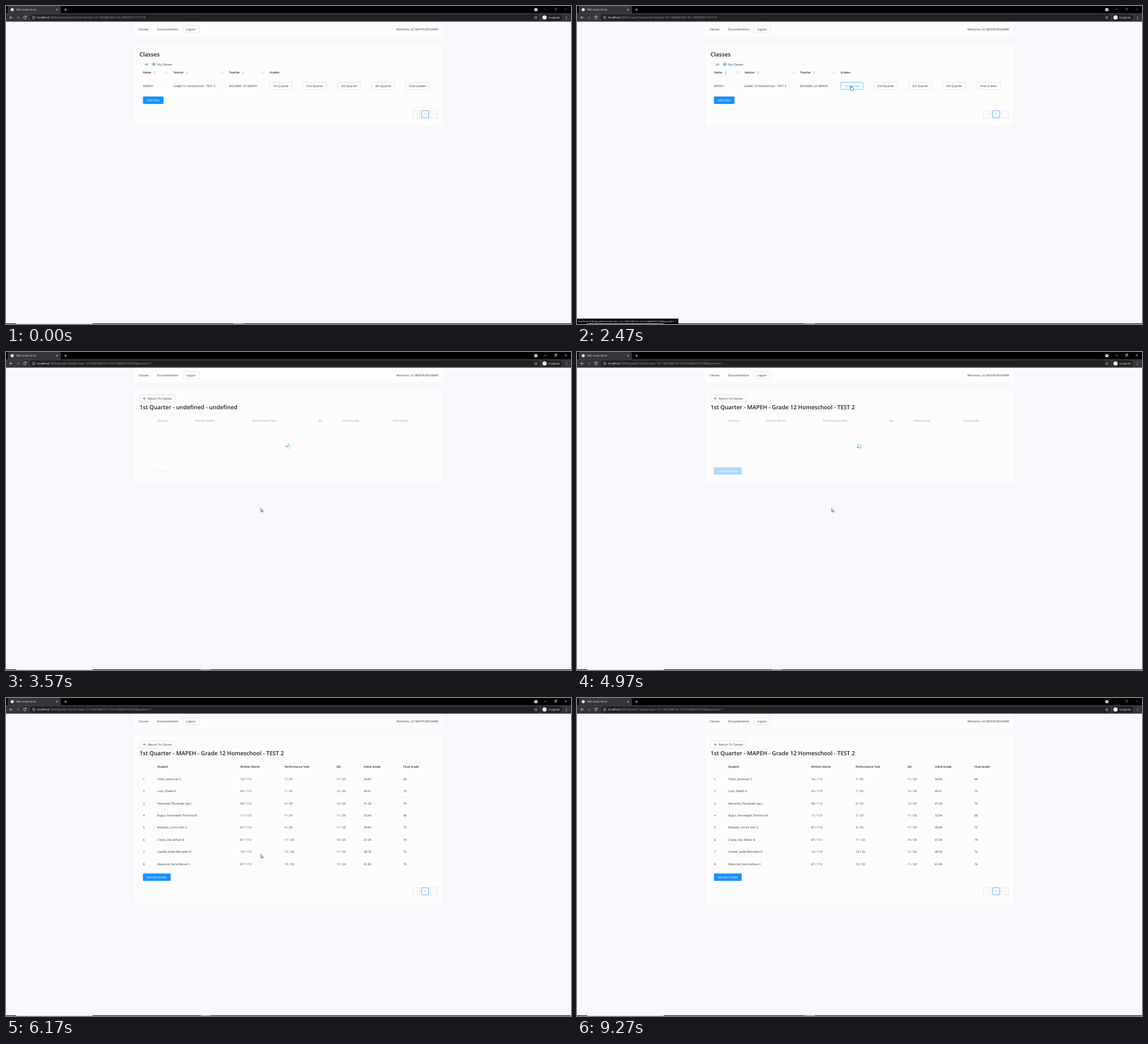
Recreate the animation shown at these times as an HTML page. Size 998 px wide and 561 px high, loop 9.47 s.

```html
<!DOCTYPE html>
<html lang="en">
<head>
<meta charset="utf-8">
<title>Grade portal</title>
<style>
  html, body { margin: 0; width: 100%; height: 100%; overflow: hidden; background: #f8f8fc; }
  svg { display: block; width: 100%; height: 100%; }
  text { font-family: "Open Sans", "Noto Sans", sans-serif; text-rendering: geometricPrecision; white-space: pre; }
</style>
</head>
<body>
<svg id="stage" viewBox="0 0 998 561"></svg>
<script>
const LOOP = 9470;
const OPENED = 2670, TITLED = 3900, LOADED = 5400, FADE = 300;
const HOVERED = 2070, FOCUSED = 2560, BLURRED = 9250;
const BLUE = '#1890ff', HOVER = '#40a9ff', INK = '#343434', DARK = '#202020';

const HOST = 'localhost';
const CLASSES_PATH = ':3000/classes?sectionId=section-1617464881803-50.149939751107176';
const GRADE_PATH = ':3000/grade?classId=class-1617482288154-75.61636894703783&quarter=1';

const STUDENTS = [
  ['Tolim, Jeremuel T.', '16 / 113', '7 / 20', '11 / 20', '34.83', '68'],
  ['Lum, Obeth K.', '43 / 113', '7 / 20', '12 / 20', '40.61', '70'],
  ['Maronita, Pluvander Jay L.', '58 / 113', '6 / 20', '13 / 20', '41.26', '70'],
  ['Bug-o, Fernwalph Thorlina M.', '11 / 113', '7 / 20', '11 / 20', '33.94', '68'],
  ['Botiwan, Lorick Ulm S.', '67 / 113', '9 / 20', '11 / 20', '49.85', '72'],
  ['Crane, Dex Milvor B.', '87 / 113', '11 / 20', '19 / 20', '67.39', '79'],
  ['Sandel, Joelle Bernadin R.', '10 / 113', '12 / 20', '11 / 20', '48.76', '72'],
  ['Malumal, Nora Felisse C.', '67 / 113', '13 / 20', '11 / 20', '61.85', '76']
];
const HEADERS = ['Student', 'Written Works', 'Performance Task', 'QA', 'Initial Grade', 'Final Grade'];
const LOADING_COLUMNS = [267.5, 334, 434.5, 551.5, 594, 683];
const COLUMNS = [267.3, 413.8, 492.2, 583.8, 632, 701.8];

// Markup helpers; y of a text is the middle of its capitals.
const text = (x, y, content, { size = 5.2, fill = INK, weight = 400, anchor = 'start', id = '' } = {}) =>
  `<text ${id && `id="${id}"`} x="${x}" y="${y + size * 0.36}" font-size="${size}" fill="${fill}" font-weight="${weight}" text-anchor="${anchor}">${content.replace(/&/g, '&amp;')}</text>`;
const rect = (x, y, w, h, fill, extra = '') =>
  `<rect x="${x}" y="${y}" width="${w}" height="${h}" fill="${fill}" ${extra}/>`;
const circle = (x, y, r, fill, extra = '') =>
  `<circle cx="${x}" cy="${y}" r="${r}" fill="${fill}" ${extra}/>`;
const line = (d, stroke, width = 0.7) =>
  `<path d="${d}" fill="none" stroke="${stroke}" stroke-width="${width}"/>`;
const group = (id, content, extra = '') => `<g id="${id}" ${extra}>${content}</g>`;

const heading = (x, y, content, id) => text(x, y, content, { size: 10.1, weight: 600, fill: DARK, id });
const label = (x, y, content) => text(x, y, content, { size: 5, weight: 600, fill: DARK });
const button = (x, y, w, content, { fill = '#fdfdfd', stroke = '#dadada', color = INK } = {}) =>
  rect(x, y, w, 12.4, fill, `stroke="${stroke}" stroke-width=".7" rx=".8"`) +
  text(x + w / 2, y + 6.3, content, { fill: color, anchor: 'middle' });
const primary = (x, y, w, content) => button(x, y, w, content, { fill: BLUE, stroke: BLUE, color: '#fff' });
const card = (y, h, id = '') =>
  rect(226.5, y, 545.5, h, '#fcfcfd', `rx="2" stroke="#f2f2f5" stroke-width=".6" ${id && `id="${id}"`}`);
const sorter = (x, y) =>
  `<path d="M${x - 1.6} ${y - 0.6}l1.6-1.8 1.6 1.8zM${x - 1.6} ${y + 0.6}l1.6 1.8 1.6-1.8z" fill="#b4b4b4"/>`;
const search = (x, y) =>
  circle(x - 0.4, y - 0.4, 1.4, 'none', 'stroke="#bbb" stroke-width=".5"') + line(`M${x + 0.6} ${y + 0.6}l1.3 1.3`, '#bbb', 0.5);
const pager = y =>
  button(718.4, y, 12.4, '') + button(734.2, y, 12.4, '1', { stroke: BLUE, color: BLUE }) + button(749.6, y, 12.4, '') +
  line(`M725.4 ${y + 4.6}l-1.6 1.6 1.6 1.6M755 ${y + 4.6}l1.6 1.6-1.6 1.6`, '#cfcfcf', 0.6);

function browserChrome() {
  const grey = '#9aa0a6', light = '#e8eaed';
  return rect(0, 0, 998, 13.5, '#000') +
    `<path d="M1 13.5q2 0 2-2V3q0-3 3-3h88q3 0 3 3v8.500q0 2 2 2z" fill="#35363a"/>` +
    rect(0, 13.3, 998, 14.3, '#35363a') +
    circle(11, 6.5, 2.7, light) +
    text(17, 6.5, 'TBW Grade Portal', { size: 4.4, fill: light }) +
    line('M88.700 5l3 3m0-3l-3 3', light) + line('M102.500 6.500h5.400m-2.700-2.700v5.400', light) +
    circle(936, 6.5, 2.8, '#fff') + `<path d="M934.600 5.800h2.800l-1.400 1.900z" fill="#111"/>` +
    group('controls', line('M951 6h4.200M969.200 4.700h2.700v2.700h-2.700zM970.200 4.600v-1h2.700v2.700h-.9M987 3.800l3.900 3.900m0-3.900l-3.900 3.900', '#fff', 0.6)) +
    line('M11.800 20.300h-5.100m2.300-2.500l-2.500 2.500 2.500 2.500', light, 0.8) +
    line('M18.300 20.300h5.100m-2.300-2.500l2.500 2.500-2.500 2.500', '#77797d', 0.8) +
    line('M35.500 18.900a2.400 2.400 0 1 0 .2 2.100M35.800 17.300v2.100h-2.100', light, 0.8) +
    rect(42, 14.7, 901, 11.2, '#202124', 'rx="5.600"') +
    circle(49, 20.3, 2.4, 'none', `stroke="${light}" stroke-width=".6"`) + line('M49 19.900v1.700m0-2.900v.6', light, 0.6) +
    `<text x="55" y="22.200" font-size="5.200" fill="${grey}"><tspan fill="#fff">${HOST}</tspan><tspan id="path"></tspan></text>` +
    `<path d="M936 17.600l.8 1.900 2 .1-1.500 1.300.5 2-1.800-1.100-1.800 1.100.5-2-1.500-1.300 2-.1z" fill="none" stroke="${light}" stroke-width=".5"/>` +
    rect(945.5, 14.7, 37, 11.2, '#202124', 'rx="5.600"') +
    circle(951.2, 20.3, 3.8, light) + text(958.3, 20.3, 'Incognito', { size: 4.6, fill: '#fff' }) +
    [18.2, 20.3, 22.4].map(y => circle(990, y, 0.55, light)).join('');
}

function navigation() {
  return rect(226, 27.6, 546, 26.4, '#fcfcfd') +
    text(234, 40.8, 'Classes') + text(266.8, 40.8, 'Documentation') + button(312.2, 34.8, 29, 'Logout') +
    text(763.7, 40.8, 'Welcome, LO NERITA BOLMAR!', { anchor: 'end' });
}

function classesPage() {
  const quarters = [[524.8, 41.4, '2nd Quarter'], [586, 40.4, '3rd Quarter'], [646.2, 39.8, '4th Quarter'], [706, 41.8, 'Final Grades']];
  const heads = [[242, 'Name', 262.3, 284], [296, 'Section', 319.6, 382.2], [394.3, 'Teacher', 418.6, 453.8]];
  return card(66.5, 146) + heading(235.8, 85, 'Classes') +
    circle(239, 102.8, 3, '#fff', 'stroke="#dedede" stroke-width=".5"') + text(245.3, 102.8, 'All') +
    circle(261, 102.8, 3, '#fff', `stroke="${BLUE}" stroke-width=".6"`) + circle(261, 102.8, 1.6, BLUE) + text(267, 102.8, 'My Classes') +
    heads.map(([x, name, sortX, searchX]) => label(x, 117.6, name) + sorter(sortX, 117.6) + search(searchX, 117.3)).join('') +
    label(465.8, 117.6, 'Grades') +
    text(242, 141, 'MAPEH') + text(295.7, 141, 'Grade 12 Homeschool - TEST 2') + text(394.3, 141, 'BOLMAR, LO NERITA') +
    group('idle', button(466, 134.7, 39.2, '1st Quarter')) +
    group('hover', button(466, 134.7, 39.2, '1st Quarter', { stroke: HOVER, color: HOVER })) +
    quarters.map(([x, w, name]) => button(x, 134.7, w, name)).join('') +
    primary(242.2, 160, 35.6, 'Add Class') + pager(184.7);
}

function gradesPage() {
  const headerRow = xs => xs.map((x, i) => label(x, 121.5, HEADERS[i])).join('');
  const rows = STUDENTS.map((cells, i) => {
    const y = 142.8 + i * 21.43;
    return text(242, y, String(i + 1)) + cells.map((cell, j) => text(COLUMNS[j], y, cell)).join('');
  }).join('');
  return card(66.5, 165, 'sheet') + button(236.2, 75.8, 62, '') +
    line('M247.200 82h-4.400m2-2l-2 2 2 2', INK) + text(250.5, 82, 'Return To Classes') +
    heading(236, 97.5, '', 'title') +
    group('loading',
      group('faded', headerRow(LOADING_COLUMNS) +
        group('disabled', text(268, 210, 'Upload Grades', { fill: '#c8c8c8', anchor: 'middle' })) +
        group('enabled', primary(242.2, 203.7, 48.2, 'Upload Grades')), 'opacity=".32"') +
      group('spinner', [[-1, -1], [1, -1], [1, 1], [-1, 1]].map(([x, y]) => circle(x * 2.14, y * 2.14, 1.35, BLUE)).join(''))) +
    group('table', headerRow(COLUMNS) + rows + primary(242.2, 309.9, 48.2, 'Upload Grades') + pager(334.7));
}

function desktopOverlay() {
  return group('status', rect(0, 551.5, 179, 9, '#000') + text(2, 556.2, HOST + GRADE_PATH, { size: 4.44, fill: '#fff' })) +
    rect(0, 560, 998, 1, '#000') + rect(18, 560, 135, 1, '#d8d8dc') +
    rect(0, 560, 18, 1, '#777462', 'id="task"') +
    group('arrow', `<path transform="scale(.39)" d="M0 0V17L4 13.200 6.400 19 9 18 6.500 12.200H12Z" fill="#fff" stroke="#111" stroke-width="1.500"/>`) +
    group('hand', `<path d="M-.7 .5q.7-.9 1.400 0V3l2.600.6q.9.3.8 1.200L3.600 7.700h-3.700L-2.200 5q0-1 .9-.7l.6.500z" fill="#fff" stroke="#111" stroke-width=".6"/>`);
}

const stage = document.getElementById('stage');
stage.innerHTML = rect(0, 0, 998, 561, '#f8f8fc') + navigation() +
  group('classes', classesPage()) + group('grades', gradesPage()) + browserChrome() + desktopOverlay();

const el = Object.fromEntries([...stage.querySelectorAll('[id]')].map(node => [node.id, node]));
const dots = [...el.spinner.children];
const show = (node, visible) => node.setAttribute('display', visible ? 'inline' : 'none');
const write = (node, content) => { if (node.textContent !== content) node.textContent = content; };
const easeInOut = p => p < 0.5 ? 4 * p ** 3 : 1 - (2 - 2 * p) ** 3 / 2;
const easeOut = p => 1 - (1 - p) ** 2;

// Each pointer move: start, end, from, to, easing.
const MOVES = [
  [700, 1100, [932, 474], [561, 259], easeOut],
  [1470, 2150, [561, 259], [484.3, 141], easeOut],
  [2720, 3250, [484.3, 141], [449.9, 275.5], easeInOut],
  [6270, 6670, [449.9, 275.5], [398.3, 343.2], easeInOut],
  [7470, 7500, [400.8, 343.3], [400.8, 343.3], p => p],
  [7500, 7501, [403.3, 343.3], [403.3, 343.3], p => p],
  [7870, 8030, [403.3, 343.3], [952, 434], p => p]
];
function pointerAt(t) {
  if (t >= 8060) return null;
  const move = MOVES.filter(m => m[0] <= t).pop();
  if (!move) return null;
  const [start, end, from, to, ease] = move;
  const p = ease(Math.min(1, (t - start) / (end - start)));
  return from.map((v, i) => v + (to[i] - v) * p);
}

function drawSpinner(age) {
  el.spinner.setAttribute('transform', `translate(499 166.500) rotate(${45 + age * 0.3})`);
  dots.forEach((dot, i) => {
    const phase = Math.max(0, age / 1000 - i * 0.4) % 2;
    dot.setAttribute('opacity', 0.3 + 0.7 * (phase < 1 ? phase : 2 - phase));
  });
}

function draw(t) {
  const opened = t >= OPENED, titled = t >= TITLED, loaded = t >= LOADED;
  const hovered = t >= HOVERED && !opened;
  const focused = t >= FOCUSED && t < BLURRED;

  show(el.classes, !opened);
  show(el.grades, opened);
  show(el.idle, !hovered);
  show(el.hover, hovered);
  show(el.status, hovered);
  write(el.path, opened ? GRADE_PATH : CLASSES_PATH);
  write(el.title, '1st Quarter - ' + (titled ? 'MAPEH - Grade 12 Homeschool - TEST 2' : 'undefined - undefined'));

  show(el.loading, !loaded);
  show(el.disabled, !titled);
  show(el.enabled, titled);
  show(el.table, loaded);
  el.sheet.setAttribute('height', loaded ? 296.5 : 165);
  const fade = Math.max(0, Math.min(1, (t - LOADED) / FADE));
  el.table.setAttribute('opacity', 0.4 + 0.6 * easeInOut(fade));
  drawSpinner(Math.max(0, t - OPENED));

  el.controls.setAttribute('opacity', focused ? 1 : 0.4);
  el.task.setAttribute('x', focused ? 344 : 402);

  const pointer = pointerAt(t);
  const pointing = hovered || (opened && pointer && pointer[1] < 147);
  show(el.arrow, pointer && !pointing);
  show(el.hand, pointer && pointing);
  if (pointer) for (const node of [el.arrow, el.hand]) node.setAttribute('transform', `translate(${pointer})`);
}

function tick() {
  draw(performance.now() % LOOP);
  requestAnimationFrame(tick);
}
tick();
</script>
</body>
</html>
```
